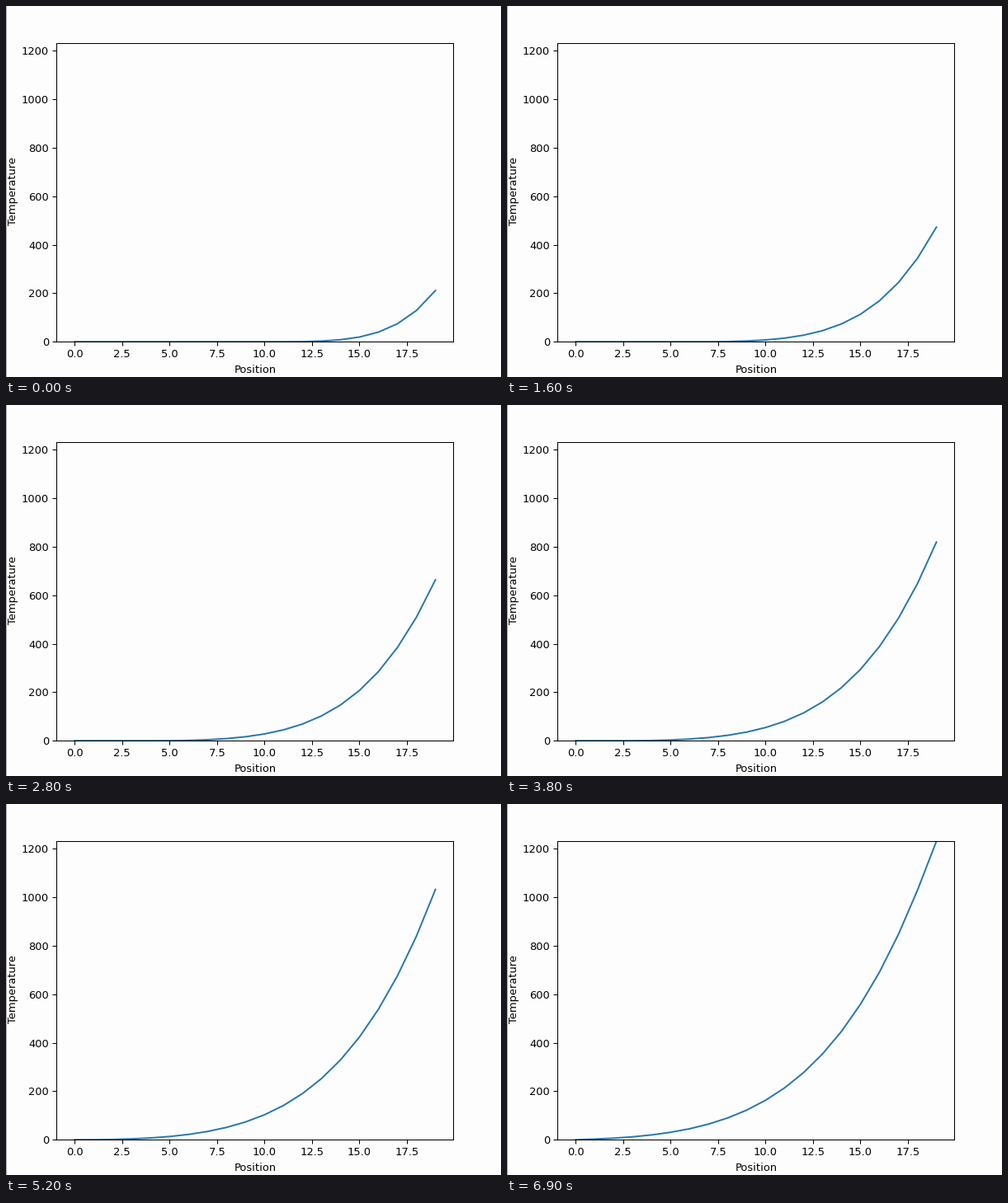
Write a matplotlib script that moves like this. It is 600 px wide and 450 px high and loops after 7000 ms.

```python
import numpy as np
import matplotlib.pyplot as plt
from matplotlib.animation import FuncAnimation
from matplotlib.lines import Line2D

W, H, DPI = 600, 450, 93.75
FRAMES, INTERVAL = 70, 100
NODES = 20
RATE = 0.485        # diffusion number of one time step
LOSS = 0.33         # constant heat loss per step
WARMUP = 12         # steps already simulated when the loop starts
LAST = 66           # heating stops here
T_MAX = 1231
BACK = "#fefdfe"


def end_temp(n):
    """Temperature of the heated end at step n."""
    return min(max(211 + 16.6 * n - 0.0155 * n * n, 0), T_MAX)


def simulate():
    """Explicit heat equation: cold left end, steadily heated right end."""
    temp = np.zeros(NODES)
    history = []
    for n in range(-WARMUP, LAST + 1):
        flow = RATE * (temp[2:] - 2 * temp[1:-1] + temp[:-2])
        temp[1:-1] = np.maximum(temp[1:-1] + flow - LOSS, 0)
        temp[-1] = end_temp(n)
        if n >= 0:
            history.append(temp.copy())
    return history


plt.rcParams["font.family"] = "DejaVu Sans"
fig = plt.figure(figsize=(W / DPI, H / DPI), dpi=DPI, facecolor=BACK)
left, right, top, bottom = 61.3, 542.4, 45.2, 407.2
ax = fig.add_axes([left / W, 1 - bottom / H, (right - left) / W, (bottom - top) / H],
                  facecolor=BACK)
ax.set_xlim(-0.95, 19.95)
ax.set_ylim(0, T_MAX)
ax.set_xlabel("Position")
ax.set_ylabel("Temperature", labelpad=2.8, y=0.504)

# thin window border along the left side
fig.add_artist(Line2D([0.2 / W] * 2, [0, 1], color="#a9a9b0", lw=72 / DPI))

history = simulate()
x = np.arange(NODES)
curve, = ax.plot(x, history[0], color="#2677ad", lw=1.5)


def update(i):
    curve.set_ydata(history[min(i, LAST)])
    return curve,


anim = FuncAnimation(fig, update, frames=FRAMES, interval=INTERVAL,
                     repeat=True, repeat_delay=0, blit=False)
plt.show()
```
